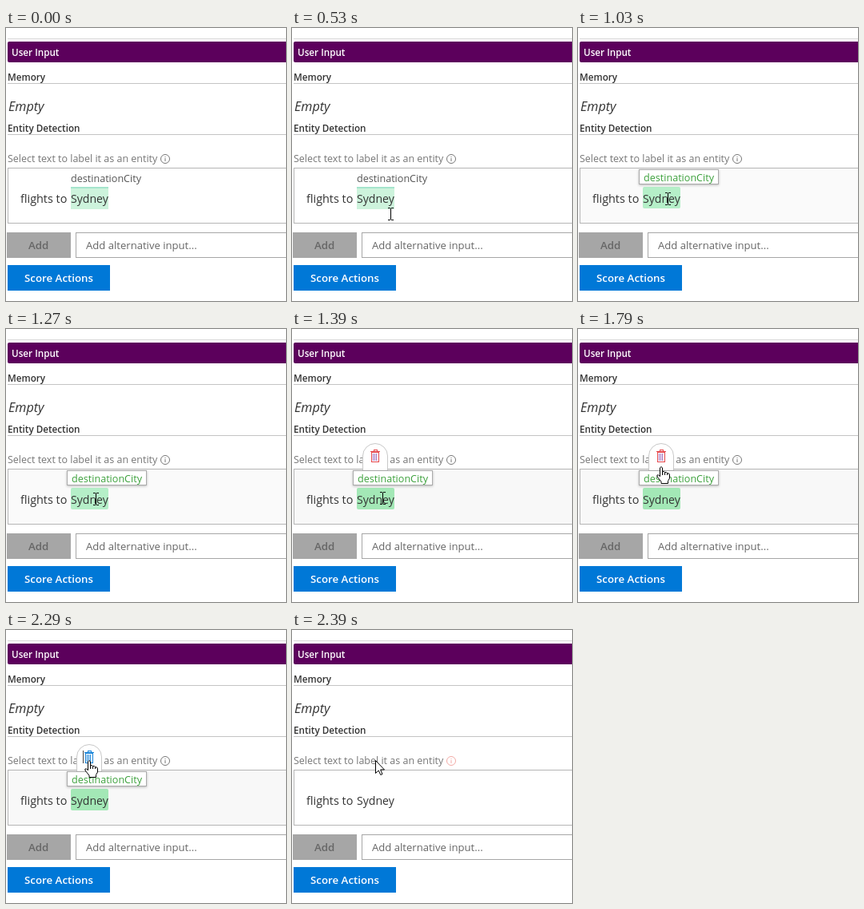
An HTML page with a canvas that plays this animation: 350 by 342 pixels, repeating every 2670 ms.

```html
<!DOCTYPE html>
<html lang="en">
<head>
<meta charset="utf-8">
<title>Entity labelling</title>
<style>
html, body { margin: 0; width: 100%; height: 100%; overflow: hidden; background: #fff; }
canvas { display: block; }
</style>
</head>
<body>
<canvas id="stage" width="350" height="342"></canvas>
<script>
const ctx = document.getElementById('stage').getContext('2d');
const LOOP = 2670;
const SANS = '"Open Sans", "Noto Sans", sans-serif';

// Pointer shape and hot spot, held from each start time
const pointer = [
  [270, 'arrow', 224, 301],
  [420, 'arrow', 160, 246],
  [530, 'beam', 123, 233],
  [630, 'beam', 120, 225],
  [800, 'beam', 109, 214],
  [910, 'beam', 99, 205],
  [1030, 'beam', 112, 214],
  [1150, 'beam', 113, 213],
  [1270, 'beam', 112, 213],
  [1390, 'beam', 113, 212],
  [1660, 'hand', 106, 190],
  [1790, 'hand', 104, 172],
  [1890, 'hand', 104, 167],
  [2010, 'hand', 104, 163],
  [2390, 'arrow', 104, 163]
];

const arrowPath = new Path2D('M.5 .5V16.5L4.2 13L6.8 18.5L9 17.5L6.6 12H11.5Z');
const handPath = new Path2D('M-1.5 1.8Q0 -.6 1.5 1.8V6.6Q4 5.9 4.6 7.6Q7 7 7.5 8.6Q10.5 8.4 10.5 11V15L8.5 18.5V21.5H0V19.2L-5 13Q-6 10.4 -3.5 10.8L-1.5 12.8Z');
const knuckles = new Path2D('M1.5 6.6V11M4.6 7.6V11M7.5 8.6V11');

function text(str, x, y, size, color, style = '') {
  ctx.font = `${style} ${size}px ${SANS}`;
  ctx.fillStyle = color;
  ctx.fillText(str, x, y);
}

function box(x, y, w, h, fill, r = 0) {
  ctx.fillStyle = fill;
  ctx.beginPath();
  ctx.roundRect(x, y, w, h, r);
  ctx.fill();
}

function frame(x, y, w, h, fill, line) {
  box(x, y, w, h, fill);
  ctx.strokeStyle = line;
  ctx.lineWidth = 1;
  ctx.strokeRect(x + .5, y + .5, w - 1, h - 1);
}

function drawInfo(color) {
  ctx.strokeStyle = color;
  ctx.lineWidth = 1;
  ctx.beginPath();
  ctx.arc(199, 164, 5.5, 0, Math.PI * 2);
  ctx.stroke();
  box(198.5, 161, 1, 1, color);
  box(198.5, 163, 1, 4, color);
}

function drawPage(t) {
  box(0, 0, 350, 342, '#fff');
  box(2, 13, 348, 1, '#d9d9d9');
  box(2, 17, 352, 26, '#5c005c', 2);
  text('User Input', 7, 35, 11.7, '#fff', '600');
  text('Memory', 2, 66, 11.7, '#333', '600');
  box(2, 69, 348, 1, '#c4c4c4');
  text('Empty', 3, 104, 16.2, '#333', 'italic');
  text('Entity Detection', 2, 130, 11.7, '#333', '600');
  box(2, 133, 348, 1, '#c4c4c4');
  text('Select text to label it as an entity', 2, 168, 12.5, '#767676');
  drawInfo(t < 2390 ? '#777' : '#f3aaa5');

  const hover = t >= 630 && t < 2390;
  const back = !hover ? '#fff' : t < 1390 ? '#fafafa' : '#f8f8f8';
  frame(2, 175, 352, 70, back, '#b5b5b5');

  box(1, 256, 80, 32, '#a6a6a6');
  text('Add', 28, 277, 13.3, '#666', '600');
  frame(87, 256, 268, 32, '#fff', '#a6a6a6');
  text('Add alternative input...', 100, 277, 13.1, '#666');
  box(2, 297, 128, 32, '#0078d7');
  text('Score Actions', 23, 318, 13.3, '#fff', '600');
}

function drawEntity(t) {
  if (t < 630) {
    box(81, 199, 47, 28, '#cdf3dc');
    box(81, 199, 47, 2, '#a5e5cd');
    text('destinationCity', 81, 193, 12.6, '#555');
  } else if (t < 2390) {
    box(81, 199, 47, 27, t < 1390 ? '#b5efc8' : '#a3e8b6', 2);
  }
  text('flights to', 18, 219, 14.4, '#333');
  text('Sydney', 81, 219, 14.1, '#333');
}

function drawTrash(color, inner) {
  ctx.strokeStyle = color;
  ctx.lineWidth = 1;
  ctx.strokeRect(102.5, 151.5, 4, 2);
  box(98, 153, 12, 1, color);
  ctx.strokeRect(99.5, 154.5, 9, 12);
  for (let x = 101; x <= 106; x += 2) box(x, 156, 1, 9, inner);
}

function drawPicker(t) {
  if (t < 630 || t >= 2390) return;
  if (t >= 1390) {
    ctx.beginPath();
    ctx.roundRect(88.5, 143.5, 31, 34, [15.5, 15.5, 0, 0]);
    ctx.fillStyle = '#fff';
    ctx.fill();
    ctx.strokeStyle = '#c8c8c8';
    ctx.lineWidth = 1;
    ctx.stroke();
    if (t < 1890) drawTrash('#e5484d', '#a070c0');
    else drawTrash('#1683d8', '#1683d8');
    if (t >= 2170) box(96, 151, 1, 16, '#444');
  }
  ctx.save();
  ctx.shadowColor = 'rgba(0,0,0,.25)';
  ctx.shadowBlur = 3;
  ctx.shadowOffsetY = 1;
  box(76, 177, 100, 19, '#fff');
  ctx.restore();
  frame(76, 177, 100, 19, '#fff', '#aaa');
  text('destinationCity', 82, 192, 12.6, '#3da13d');
}

function drawPointer(t) {
  const step = pointer.findLast(p => p[0] <= t);
  if (!step) return;
  const [, kind, x, y] = step;
  ctx.save();
  ctx.translate(x, y);
  if (kind === 'beam') {
    box(0, -7, 1, 14, '#000');
    for (const end of [-8, 7]) {
      box(-3, end, 3, 1, '#000');
      box(1, end, 3, 1, '#000');
    }
  } else {
    const path = kind === 'arrow' ? arrowPath : handPath;
    ctx.fillStyle = '#fff';
    ctx.strokeStyle = '#000';
    ctx.lineWidth = 1;
    ctx.fill(path);
    ctx.stroke(path);
    if (kind === 'hand') ctx.stroke(knuckles);
  }
  ctx.restore();
}

function draw() {
  const t = performance.now() % LOOP;
  drawPage(t);
  drawEntity(t);
  drawPicker(t);
  drawPointer(t);
  requestAnimationFrame(draw);
}
draw();
</script>
</body>
</html>
```
